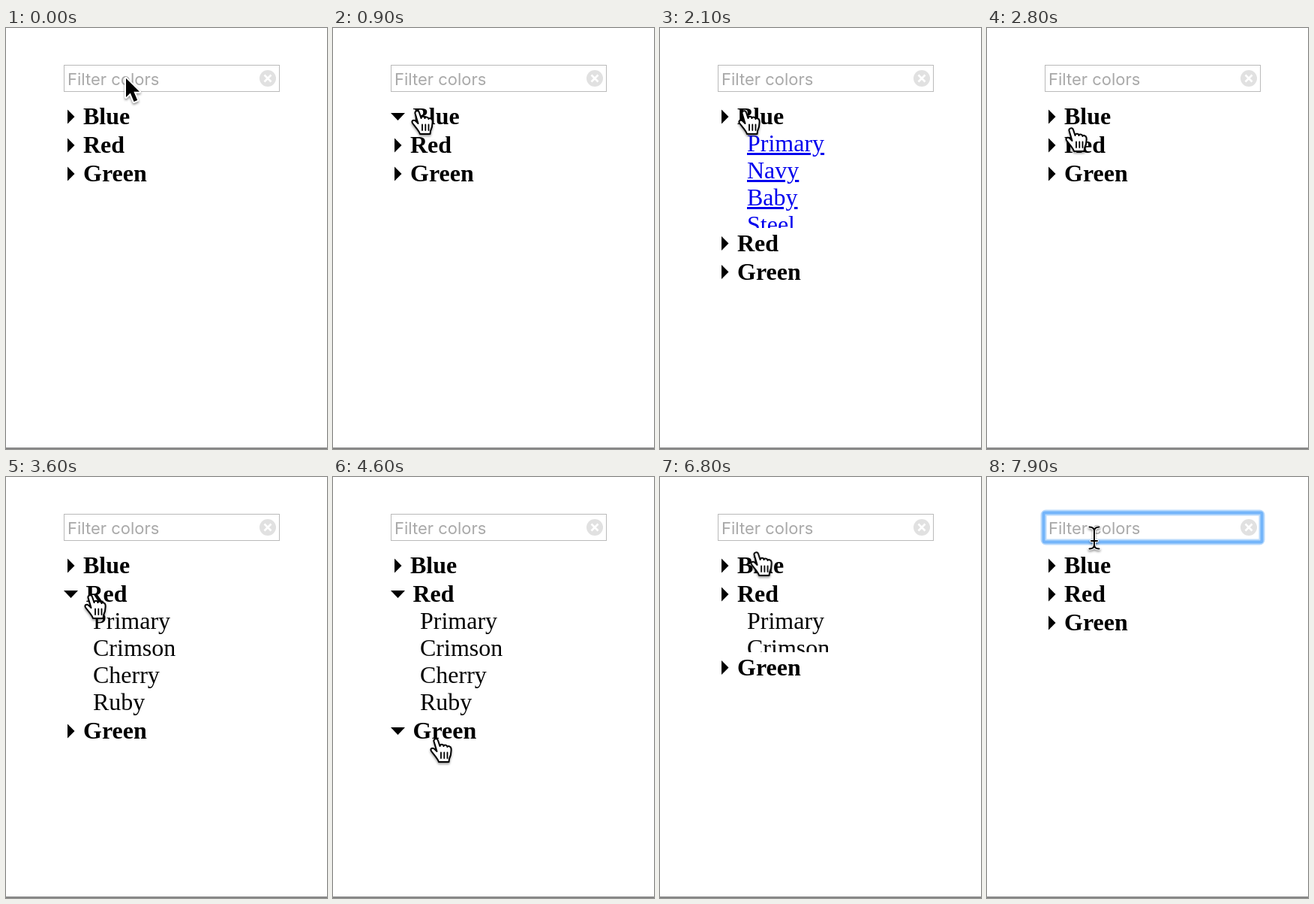
Animation of 428x560 px, one loop 8 s. Source, as an HTML page:

```html
<!DOCTYPE html>
<html lang="en">
<head>
<meta charset="utf-8">
<title>Color filter</title>
<style>
  @property --open { syntax: "<number>"; inherits: true; initial-value: 0; }

  html, body { margin: 0; width: 100%; height: 100%; overflow: hidden; background: #fff; }
  body { position: relative; font: 32px/36px "Liberation Serif", serif; color: #000; }
  svg { position: absolute; left: 0; top: 0; overflow: visible; }
  .loop, summary, .items, .ring, .caret, .cursor, .cursor g {
    animation-duration: 8s;
    animation-iteration-count: infinite;
  }

  /* Search field */
  .placeholder { font: 22px Inter, sans-serif; fill: #a9a9a9; }
  .ring { animation-name: focus; }
  .caret { animation-name: caret; animation-timing-function: step-end; }

  /* Color groups */
  .list { position: absolute; left: 77px; top: 99px; width: 300px; }
  .group { margin-bottom: 2px; }
  .summary {
    position: relative; height: 36px; font-weight: bold;
    padding-left: calc(26px + 3.5px * var(--open));
    animation: 8s step-end infinite;
  }
  .summary::before, .summary::after { content: ""; position: absolute; background: #000; }
  .summary::before {
    left: 4.5px; top: 9px; width: 10px; height: 20px;
    clip-path: polygon(0 0, 100% 50%, 0 100%);
    opacity: calc(1 - var(--open));
  }
  .summary::after {
    left: 0; top: 14px; width: 19px; height: 10px;
    clip-path: polygon(0 0, 100% 0, 50% 100%);
    opacity: var(--open);
  }
  .items {
    height: 0; padding-left: 39px; overflow: hidden;
    animation-timing-function: cubic-bezier(.37, 0, .63, 1);
  }
  .items div { height: 36px; }
  .items u { color: #00e; }
  .blue .summary { animation-name: blue-open; }
  .blue .items { animation-name: blue-slide; }
  .red .summary { animation-name: red-open; }
  .red .items { animation-name: red-slide; }
  .green .summary { animation-name: green-open; }
  .green .items { animation-name: green-slide; }

  /* Cursor */
  .cursor { animation-name: move; animation-timing-function: ease-in-out;
            filter: drop-shadow(0 2px 1.5px rgba(0, 0, 0, .4)); }
  .cursor g { animation-timing-function: step-end; }
  .arrow { animation-name: arrow; }
  .hand { animation-name: hand; }
  .beam { animation-name: beam; }

  @keyframes blue-open  { 0%, 24.45% { --open: 0 } 11.2% { --open: 1 } 100% { --open: 0 } }
  @keyframes red-open   { 0%, 82.2% { --open: 0 } 39.85% { --open: 1 } 100% { --open: 0 } }
  @keyframes green-open { 0%, 69.9% { --open: 0 } 57.4% { --open: 1 } 100% { --open: 0 } }

  @keyframes blue-slide  { 0%, 11.56% { height: 0 } 16.56%, 24.5% { height: 180px } 29.5%, 100% { height: 0 } }
  @keyframes red-slide   { 0%, 39.88% { height: 0 } 44.88%, 82.24% { height: 144px } 87.24%, 100% { height: 0 } }
  @keyframes green-slide { 0%, 57.5% { height: 0 } 62.5%, 69.94% { height: 36px } 74.94%, 100% { height: 0 } }

  @keyframes focus {
    0%, 91.9% { opacity: 0 }
    93.7%, 100% { opacity: 1 }
  }
  @keyframes caret { 0%, 98.7% { opacity: 0 } 92.4% { opacity: 1 } 100% { opacity: 0 } }

  @keyframes move {
    0%, 3.1% { transform: translate(160px, 67px) }
    7.5%, 32.6% { transform: translate(114px, 110px) }
    37.5%, 48.1% { transform: translate(114px, 157px) }
    55%, 65.6% { transform: translate(139px, 348px) }
    67.5%, 70% { transform: translate(145px, 343px) }
    77.5% { transform: translate(128px, 153px) }
    82% { transform: translate(128px, 153px); animation-timing-function: ease-in }
    85% { transform: translate(130px, 100px); animation-timing-function: ease-out }
    88.75%, 100% { transform: translate(143px, 81px) }
  }
  @keyframes arrow {
    0%, 85.7% { opacity: 1 }
    5.9%, 86.7%, 100% { opacity: 0 }
  }
  @keyframes hand {
    0%, 49.4%, 71.6%, 85.7%, 100% { opacity: 0 }
    5.9%, 53.1%, 75.9% { opacity: 1 }
  }
  @keyframes beam {
    0%, 53.1%, 75.9% { opacity: 0 }
    49.4%, 71.6%, 86.7%, 100% { opacity: 1 }
  }
</style>
</head>
<body>
  <svg width="428" height="560">
    <path d="M0 559H428" stroke="#888" stroke-width="2"/>
    <rect x="77.5" y="49.5" width="287" height="35" fill="#fff" stroke="#bababa"/>
    <text class="placeholder" x="82" y="76">Filter colors</text>
    <circle cx="349" cy="67" r="11" fill="#e1e1e1"/>
    <path d="M344.5 62.5l9 9m0-9l-9 9" stroke="#fff" stroke-width="2.6"/>
    <g class="ring" fill="none">
      <rect x="75.5" y="47.5" width="291" height="39" rx="3" stroke="#b9dafc" stroke-width="8"/>
      <rect x="75.5" y="47.5" width="291" height="39" rx="2" stroke="#74b5fa" stroke-width="4"/>
    </g>
    <rect class="caret" x="82" y="54" width="2" height="26"/>
  </svg>

  <div class="list">
    <div class="group blue">
      <div class="summary">Blue</div>
      <div class="items">
        <div><u>Primary</u></div><div><u>Navy</u></div><div><u>Baby</u></div>
        <div><u>Steel</u></div><div><u>Ocean</u></div>
      </div>
    </div>
    <div class="group red">
      <div class="summary">Red</div>
      <div class="items">
        <div>Primary</div><div>Crimson</div><div>Cherry</div><div>Ruby</div>
      </div>
    </div>
    <div class="group green">
      <div class="summary">Green</div>
      <div class="items"><div>Primary</div></div>
    </div>
  </div>

  <svg class="cursor" width="1" height="1" stroke-linejoin="round" stroke-linecap="round">
    <g class="arrow">
      <path d="M0 0V25L5.8 19.4L10.6 31L15.2 29L10.4 17.8H18Z" stroke="#fff" stroke-width="4" paint-order="stroke"/>
    </g>
    <g class="hand" transform="translate(-10 -1)" stroke="#000" stroke-width="2">
      <path fill="#fff" d="M5.5 4.5C5 1 10 0 11 3.5L13.5 11C14 8 18 8 18.5 11C19 9 23 9 23.5 12C24 10.5 28 11 28.5 14C29 20 28 24 26 28L25.5 32H12C11 28 6 23 2 17.5C0 14 4 12.5 6.5 15L9.5 18Z"/>
      <path d="M15 19.5V27M19.3 19.5V27M23.5 19.5V27" stroke-width="1.8"/>
    </g>
    <g class="beam" fill="none">
      <path id="beam" d="M-6.5-14.5C-2-14.5 0-12.5 0-9C0-12.5 2-14.5 6.5-14.5M0-9V9M-4 4H4M-6.5 14.5C-2 14.5 0 12.5 0 9C0 12.5 2 14.5 6.5 14.5" stroke="#fff" stroke-width="4"/>
      <use href="#beam" style="display:none"/>
      <path d="M-6.5-14.5C-2-14.5 0-12.5 0-9C0-12.5 2-14.5 6.5-14.5M0-9V9M-4 4H4M-6.5 14.5C-2 14.5 0 12.5 0 9C0 12.5 2 14.5 6.5 14.5" stroke="#000" stroke-width="2"/>
    </g>
  </svg>
</body>
</html>
```
